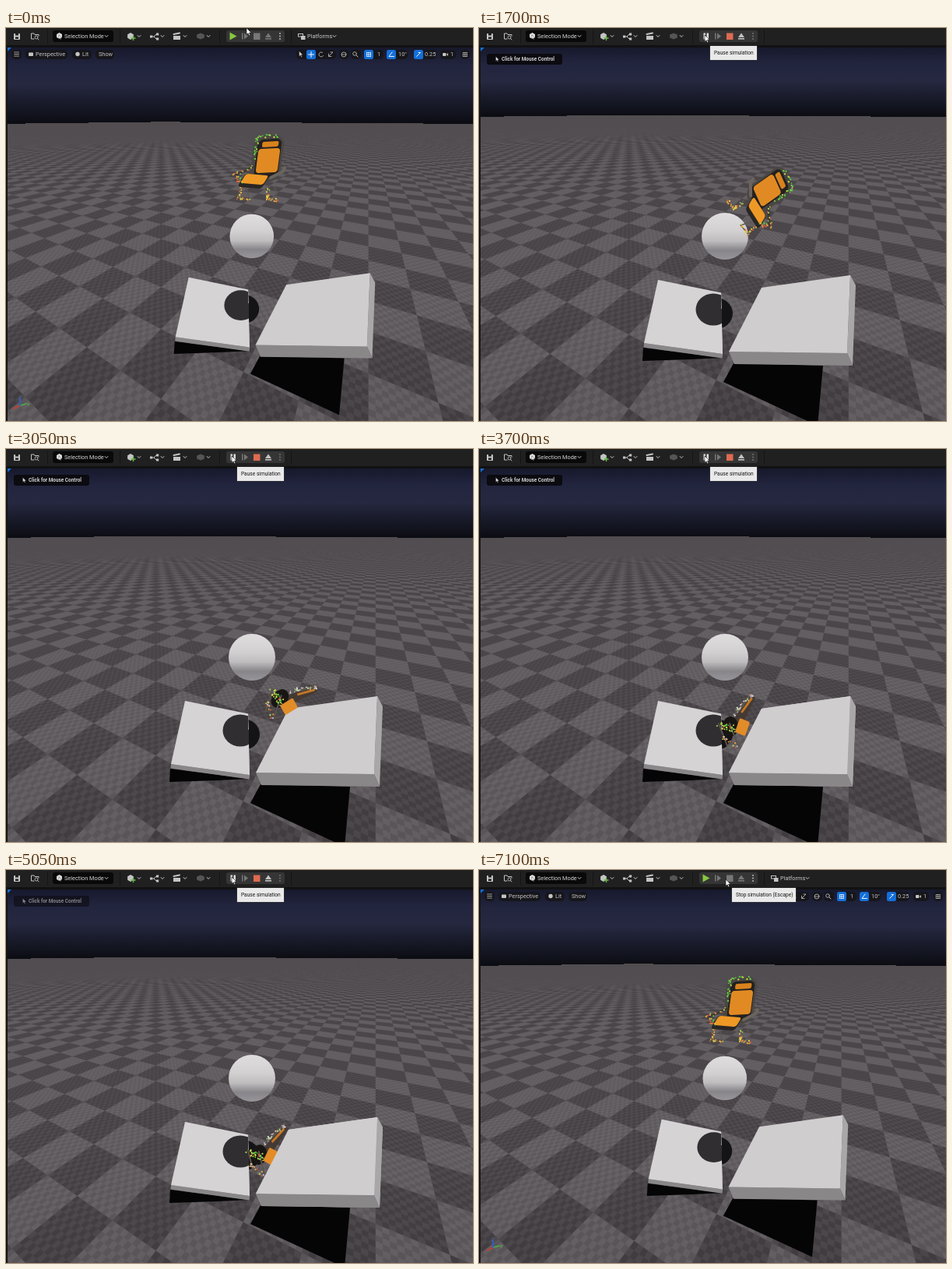
Animation of 600 by 504 pixels, one loop 7.15 s. Source, as an HTML page with a canvas:

```html
<!DOCTYPE html>
<html lang="en">
<head>
<meta charset="utf-8">
<title>Chair physics simulation</title>
<style>
html, body { margin: 0; width: 600px; height: 504px; overflow: hidden; background: #151515; }
canvas { display: block; }
</style>
</head>
<body>
<canvas id="stage" width="600" height="504"></canvas>
<script>
const LOOP = 7150, PLAY = 1000, STOP = 6600;
const FLIP = 2050, WEDGE = 2950;             // the chair shows another side
const ZOOM = 1.06, PIVOT = { x: 312, y: 267 }; // play view against editor view
const stage = document.getElementById('stage').getContext('2d');
let g = stage;

// ---------- helpers ----------
const clamp = (v, a = 0, b = 1) => Math.min(b, Math.max(a, v));
const smooth = p => (p = clamp(p), p * p * (3 - 2 * p));
const mix = (a, b, p) => a + (b - a) * p;

function trace(pts) {
  g.beginPath();
  for (let i = 0; i < pts.length; i += 2) g.lineTo(pts[i], pts[i + 1]);
}
function poly(fill, ...pts) { trace(pts); g.closePath(); g.fillStyle = fill; g.fill(); }
function line(color, width, ...pts) {
  trace(pts);
  g.strokeStyle = color; g.lineWidth = width; g.lineJoin = g.lineCap = 'round';
  g.stroke();
}
function rect(fill, x, y, w, h, r = 0) {
  g.beginPath(); g.roundRect(x, y, w, h, r); g.fillStyle = fill; g.fill();
}
function disc(fill, x, y, rx, ry = rx) {
  g.beginPath(); g.ellipse(x, y, rx, ry, 0, 0, 7); g.fillStyle = fill; g.fill();
}
function arc(color, x, y, r, from = 0, to = 7) {
  g.beginPath(); g.arc(x, y, r, from, to);
  g.strokeStyle = color; g.lineWidth = 0.8; g.stroke();
}
function text(str, x, y, color = '#c4c4c4', size = 7.35, weight = 400) {
  g.font = `${weight} ${size}px Roboto, "Open Sans", sans-serif`;
  g.textBaseline = 'middle';
  g.fillStyle = color;
  g.fillText(str, x, y);
}
function gradient(y0, y1, ...colors) {
  const grad = g.createLinearGradient(0, y0, 0, y1);
  colors.forEach((c, i) => grad.addColorStop(i / (colors.length - 1), c));
  return grad;
}
function within(matrix, paint) {
  g.save(); g.transform(...matrix); paint(); g.restore();
}
function random(seed) {
  return () => (seed = (seed * 16807) % 2147483647) / 2147483647;
}
function layer(paint) {
  const canvas = new OffscreenCanvas(600, 504);
  g = canvas.getContext('2d');
  paint();
  g = stage;
  return canvas;
}

// ---------- scene ----------
// Square wave of period 2, averaged over a width
const ramp = x => 1 - Math.abs(x - 2 * Math.floor(x / 2) - 1);
const wave = (x, w) => (ramp(x + w / 2) - ramp(x - w / 2)) / w;

// A square chequered plane whose far corner points a little left of centre
function paintGround(zoom) {
  const horizon = 107.5, focal = 338, tile = 0.22, reach = 325;
  const yaw = Math.PI / 4 - Math.atan2(108, focal);
  const ka = Math.cos(yaw) / tile, kb = Math.sin(yaw) / tile;
  const va = 300 + focal * Math.tan(yaw), vb = 300 - focal / Math.tan(yaw);
  const img = g.createImageData(600, 504);
  for (let y = 100; y < 504; y++) {
    const d = mix(PIVOT.y, y, zoom) - horizon;
    for (let x = 2; x < 600; x++) {
      const px = mix(PIVOT.x, x, zoom);
      const u = (px - va) / d * ka, v = (px - vb) / d * kb;
      if (d <= 0 || Math.max(Math.abs(u), Math.abs(v)) > reach) continue;
      const wu = (ka + Math.abs(u)) / d * zoom, wv = (kb + Math.abs(v)) / d * zoom;
      const coarse = wave(u, wu) * wave(v, wv);
      const fine = wave(u * 10, wu * 10) * wave(v * 10, wv * 10);
      const lum = 78 + 6 * clamp(d / 90) - 5 * clamp((d - 250) / 150) + 12 * coarse + 5 * fine;
      img.data.set([lum + 3, lum - 2, lum + 1, 255], (y * 600 + x) * 4);
    }
  }
  return img;
}

// Top corners clockwise from the far left; the sides hang by (dx, dy)
function prism(top, dx, dy, topFill, frontFill, rightFill) {
  const [, , bx, by, cx, cy, ex, ey] = top;
  poly(rightFill, bx, by, bx + dx, by + dy - 3, cx + dx, cy + dy, cx, cy);
  poly(frontFill, cx, cy, ex, ey, ex + dx, ey + dy, cx + dx, cy + dy);
  poly(topFill, ...top);
}
const drawSlab = () =>
  prism([363, 333, 477, 317, 473, 417, 321, 415], 7, 16, '#d0cdcf', '#8a8789', '#aaa7a9');

function drawObjects() {
  const pad = [230, 323, 311, 339.5, 313, 418, 212, 404];
  poly('#050506', 211, 410, 313, 423, 270, 425, 210, 427);
  poly('#050506', 327, 430, 442, 433, 435, 510, 314, 454);
  disc('#141315', 304, 366, 22, 20);
  prism(pad, -0.5, 5.5, '#d6d3d5', '#8a8789', '#aaa7a9');
  g.save();
  trace(pad); g.clip();
  disc('#302e31', 301, 361, 22.5, 20.5);
  g.restore();
  drawSlab();
  disc(gradient(237, 297, '#dfdcdd', '#dad7d8', '#d2cfd1', '#c0bdbf', '#88858a', '#98959a'), 316, 267, 30);
}

function buildScene(zoom) {
  const ground = layer(() => g.putImageData(paintGround(zoom), 0, 0));
  const k = 1 / zoom;
  return layer(() => {
    rect(gradient(24, mix(PIVOT.y, 113, k), '#16182b', '#22253e', '#25283f', '#181a29', '#0c0d13'), 0, 24, 600, 110);
    g.drawImage(ground, 0, 0);
    within([k, 0, 0, k, PIVOT.x * (1 - k), PIVOT.y * (1 - k)], drawObjects);
  });
}

// ---------- chair, three aspects ----------
const LIME = ['#77e04a', '#4fc744', '#c9dc49'];
const AMBER = ['#e8d24f', '#e9a03c', '#d8603f', '#b7d650'];
const PALE = ['#e4e0e0', '#b9b3d8', '#d8b0a4', '#9adf7c'];

// Coloured points strewn along a segment
function specks(count, colors, spread, x0, y0, x1, y1) {
  const rnd = random(count * 991 + 7);
  for (let i = 0; i < count; i++) {
    const p = rnd(), color = colors[Math.floor(rnd() * colors.length)];
    disc(color, mix(x0, x1, p) + (rnd() - 0.5) * spread,
      mix(y0, y1, p) + (rnd() - 0.5) * spread, 0.8 + rnd() * 0.4);
  }
}

function chairFront() {
  const foot = (x, n) => {
    line('#5d5853', 1.4, x - 3, 20, x - 8, 36, x + 7, 39, x + 3, 22);
    specks(n, AMBER, 4, x - 8, 36, x + 7, 39);
    specks(n - 3, AMBER, 4, x - 4, 22, x - 7, 35);
  };
  foot(-21, 13);
  foot(15, 14);
  within([1, -0.06, -0.13, 1, 0, 0], () => {
    rect('#4a4743', -13, -44, 39, 60, 13);
    rect('#232120', -8, -39, 31, 50, 7);
    rect('#d8821d', -2, -36, 21, 7, 2);
    rect('#e18a23', -6, -27, 28, 31, 4);
  });
  within([1, 0.08, -0.6, 1, 0, 0], () => {
    rect('#292624', -16, 6, 31, 17, 4);
    rect('#ee9926', -15, 6, 29, 12, 3);
  });
  line('#6b645e', 4, 13, 10, 29, 2, 31, -3);
  line('#3d3936', 3, -31, 6, -9, -4);
  specks(18, LIME, 4, -4, -42, -9, 2);
  specks(16, LIME.concat(AMBER), 6, -33, 3, -25, 16);
  specks(12, LIME, 4, -6, -43, 22, -44);
  specks(10, LIME.concat(AMBER), 5, -31, 5, -9, -4);
}

function chairBack() {
  line('#736a5e', 4, -31, -20, -32, 2, -29, 18, -10, 24, 26, 17);
  for (let i = 0; i < 4; i++) {
    const x = -19 + i * 11, low = 24 - i * 2.5;
    poly(i % 2 ? '#66594c' : '#40382f', x, -22, x + 7, -24, x + 12, low - 2, x + 2, low);
  }
  specks(38, LIME.concat(AMBER), 12, -33, -22, 34, -22);
  specks(26, AMBER, 14, -30, -12, 28, -12);
}

function chairSide() {
  poly('#443a33', -4, 0, 18, -36, 25, -31, 8, 4);
  line('#5d5652', 3, -16, 4, 4, -15, 20, -37);
  line('#c27628', 3, 8, -13, 20, -30);
  disc('#181615', -7, 6, 10, 13);
  within([1, 0.4, -0.35, 1, 7, 6], () => rect('#e28c28', -5, -9, 13, 18, 2));
  for (const x of [-22, -8]) line('#5a524e', 2, x, 2, x + 11, 31, x + 18, 22);
  specks(24, PALE, 5, -3, -9, 22, -35);
  specks(30, LIME.concat(AMBER), 9, -22, 4, 0, 10);
  specks(14, AMBER.concat(PALE), 5, -18, 18, 2, 32);
}

// [time, x, y]: drop, bounce off the ball, land on the slab, slide into the gap
const path = [
  [PLAY, 327, 182], [1180, 328, 193], [1700, 364, 222], [FLIP, 388, 286],
  [2400, 395, 322], [WEDGE, 366, 315], [3700, 330, 350], [5050, 333, 360]
];
function place(t) {
  const next = path.findIndex(key => key[0] > t);
  if (next < 1) return path[next ? path.length - 1 : 0].slice(1);
  const a = path[next - 1], b = path[next], p = (t - a[0]) / (b[0] - a[0]);
  return [mix(a[1], b[1], p), mix(a[2], b[2], p)];
}
function spin(t) {
  if (t < FLIP) return 62 * Math.max(0, (t - 1180) / 520);
  if (t < WEDGE) return -Math.abs(t - 2400) / 10;
  return 45 * clamp((3700 - t) / 750) + 7 * clamp((t - 3700) / 1000);
}

function drawChair(t, running) {
  if (!running) t = PLAY;
  const [x, y] = place(t), a = spin(t) * Math.PI / 180;
  const aspect = t < FLIP ? chairFront : t < WEDGE ? chairBack : chairSide;
  const turn = t < FLIP ? Math.cos(Math.PI * smooth((t - 1180) / 400)) : 1;
  const c = Math.cos(a), s = Math.sin(a);
  within([c * turn, s * turn, -s, c, x, y], aspect);
  if (t > 3300) drawSlab();
}

// ---------- interface ----------
const LIGHT = '#c4c4c4', DIM = '#777', BLUE = '#146fd8';
const chevron = x => line(LIGHT, 1, x - 2, 9.5, x, 11.5, x + 2, 9.5);

function pointer(x, y, s = 0.85, fill = '#fff') {
  const shape = [0, 0, 0, 10, 2.4, 7.9, 4, 11.4, 5.6, 10.7, 4.1, 7.3, 7.2, 7.1];
  within([s, 0, 0, s, x, y], () => {
    poly(fill, ...shape);
    line('#111', 0.7, ...shape, 0, 0);
  });
}
function hexagon(fill, x, y, r) {
  const pts = [];
  for (let a = 0.5; a < 6; a++) pts.push(x + r * Math.cos(a * Math.PI / 3), y + r * Math.sin(a * Math.PI / 3));
  poly(fill, ...pts);
}

function drawToolbar(running, hoverStop) {
  rect('#202020', 0, 0, 600, 22);
  rect('#111', 0, 22, 600, 3);
  rect('#141414', 0, 22, 2, 482);
  poly(BLUE, 2, 25, 7, 25, 2, 30);

  rect(LIGHT, 10, 7, 8, 8, 1);
  for (const y of [7, 11.5]) rect('#202020', 12, y, 4, 2.5);
  line(LIGHT, 1, 36, 14, 32.5, 14, 32.5, 7, 36, 7, 37, 8.5, 42, 8.5, 42, 10);
  arc(LIGHT, 39, 12, 2);
  line(LIGHT, 1, 40.5, 13.5, 42, 15);

  rect('#090909', 60, 3, 78, 15, 3);
  hexagon('#ddd', 68.5, 10, 4);
  pointer(68, 9, 0.5);
  text('Selection Mode', 75, 11, '#d8d8d8');
  for (const x of [53, 146, 274, 366]) rect('#151515', x, 2, 1, 18);

  hexagon(LIGHT, 160, 10.5, 4.5);
  line('#69b84a', 1.5, 163.5, 10.5, 163.5, 15.5);
  line('#69b84a', 1.5, 161, 13, 166, 13);
  line(LIGHT, 1, 187, 11, 190, 11, 193, 8);
  line(LIGHT, 1, 190, 11, 193, 14);
  for (const [x, y] of [[185, 9.5], [193, 6.5], [193, 12.5]]) rect(LIGHT, x, y, 3.2, 3);
  rect(LIGHT, 215, 10, 9, 5);
  line(LIGHT, 2, 215.5, 8, 223, 6.5);
  within([1.4, 0, 0, 1, 250, 10.5], () => hexagon('#555', 0, 0, 4));
  [129, 171, 201, 230, 260].forEach(chevron);

  rect('#353535', 283, 3, 75, 15, 3);
  if (running) for (const x of [288.5, 292.5]) rect('#ddd', x, 6.5, 2.5, 8);
  else poly('#87c83f', 287.5, 5.5, 296.5, 10.5, 287.5, 15.5);
  rect(DIM, 303, 6.5, 1.5, 8);
  poly(DIM, 306, 6.5, 311, 10.5, 306, 14.5);
  rect(!running ? DIM : hoverStop ? '#e0732f' : '#df6a50', 318, 6.5, 8.5, 8.5);
  const eject = running ? LIGHT : DIM;
  poly(eject, 333, 12, 337, 6.5, 341, 12);
  rect(eject, 333, 13, 8, 1.6);
  for (const y of [7, 10.5, 14]) disc(running ? DIM : LIGHT, 352, y, 0.9);

  if (!running) {
    rect(LIGHT, 375, 7, 7, 4.5);
    rect('#202020', 376, 8, 5, 2.5);
    rect(LIGHT, 379, 10, 5.5, 5);
    text('Platforms', 387, 11, '#c8c8c8');
    chevron(422);
  }
}

function mesh(x, color) {
  for (let d = 0; d < 6; d += 2.5) {
    line(color, 0.7, x + d, 31.5, x + d, 36.5);
    line(color, 0.7, x, 31.5 + d, x + 5, 31.5 + d);
  }
}

// [x, width, label, label x]
const pills = [
  [7, 13], [25, 54, 'Perspective', 38], [85, 25, 'Lit', 98], [115, 24, 'Show', 119],
  [373, 51], [428, 13], [443, 13], [460, 25, '1', 477], [489, 27, '10°', 504],
  [524, 29, '0.25', 538], [558, 20, '1', 571], [584, 12]
];
function drawViewportBar() {
  for (const [x, w, label, at] of pills) {
    rect('rgba(22,22,25,.92)', x, 28, w, 12, 5);
    if (label) text(label, at, 34);
  }
  for (const x of [386, 460, 489, 524]) rect(BLUE, x, 28, 12, 12, 2.5);
  for (const y of [31, 33.5, 36]) line(LIGHT, 0.8, 10.5, y, 16.5, y);
  rect(LIGHT, 29, 31.5, 6, 4.5, 1);
  disc(LIGHT, 92, 33.5, 2.7);
  pointer(376.5, 29.5, 0.7, '#ccc');
  line('#fff', 1, 388.5, 34, 395.5, 34);
  line('#fff', 1, 392, 30.5, 392, 37.5);
  arc(LIGHT, 405, 34, 3, 0.5, 5.2);
  line(LIGHT, 0.8, 414.5, 33, 414.5, 36.5, 418, 36.5);
  line(LIGHT, 0.8, 415, 36, 420, 31, 417, 31);
  arc(LIGHT, 434, 34, 3);
  line(LIGHT, 0.7, 431, 34, 437, 34);
  arc(LIGHT, 448, 33, 2.3);
  line(LIGHT, 1, 450, 35, 452, 37);
  mesh(463.5, '#fff');
  line('#fff', 0.9, 496, 31, 492, 36.5, 498.5, 36.5);
  line('#fff', 0.9, 527.5, 36.5, 532.5, 31.5, 530, 31.5);
  rect(LIGHT, 561, 32, 4.5, 4, 1);
  poly(LIGHT, 566, 34, 568, 32, 568, 36);
  mesh(587.2, LIGHT);
}

function drawAxes() {
  line('#45b63b', 1.4, 18, 484, 26, 482);
  line('#ca3b32', 1.6, 18, 484, 10, 488);
  line('#2b62df', 1.6, 18, 484, 18, 476);
  text('Z', 16, 474, '#3c70e6', 6);
  text('Y', 27, 483, '#5cc24f', 6);
}

function drawHint(alpha) {
  g.globalAlpha = alpha;
  rect('#0b0b10', 10, 33, 97, 14, 3);
  pointer(21.5, 36.5, 0.6, '#ddd');
  text('Click for Mouse Control', 29, 40.3, '#d2d2d2', 6.4, 700);
  g.globalAlpha = 1;
}

function tooltip(str, x, w) {
  rect('#3a3a3a', x - 0.5, 22.5, w + 1, 19);
  rect('#e9e9e9', x, 23, w, 18);
  text(str, x + 5, 32.3, '#171717', 6.6);
}

// ---------- timeline ----------
const playScene = buildScene(1), editScene = buildScene(ZOOM);

function draw(t) {
  const running = t >= PLAY && t < STOP;
  const toPlay = smooth((t - 50) / 600), toStop = smooth((t - 5450) / 400);
  g.drawImage(running ? playScene : editScene, 0, 0);
  drawChair(t, running);
  drawToolbar(running, toStop > 0.9);
  if (running) drawHint(clamp((6450 - t) / 2200) ** 1.2);
  else {
    drawViewportBar();
    drawAxes();
  }
  if (t >= 1450 && t < 5500) tooltip('Pause simulation', 297, 60);
  if (t >= 5950) tooltip('Stop simulation (Escape)', 325, 82);
  pointer(309 - 19 * toPlay + 27 * toStop, 9 * toPlay + 3 * toStop);
}

const start = performance.now();
function frame() {
  draw((performance.now() - start) % LOOP);
  requestAnimationFrame(frame);
}
frame();
</script>
</body>
</html>
```
